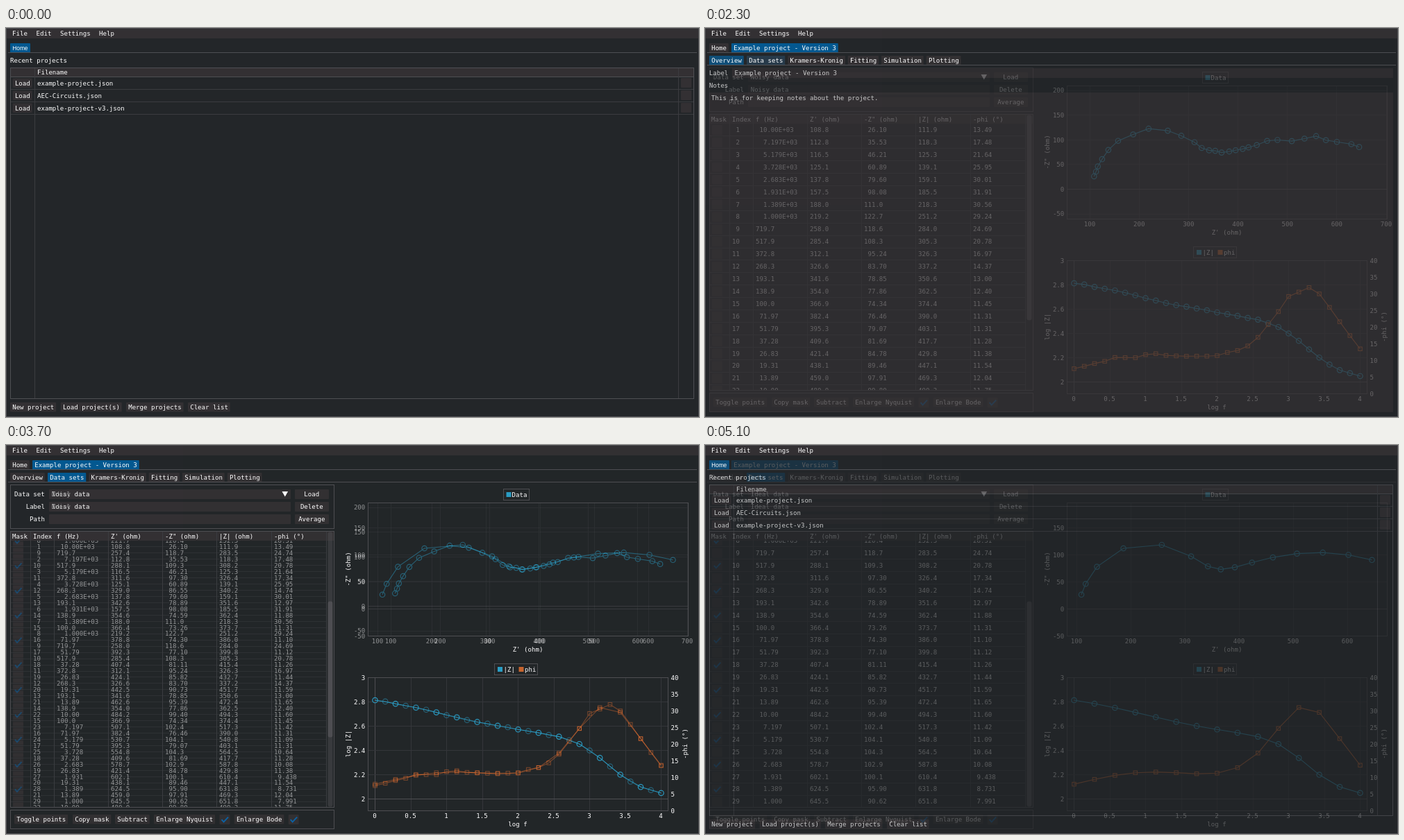
These frames come from a looping animation (998 by 561 pixels, 5.2 s). An HTML page:

```html
<!DOCTYPE html>
<html lang="en">
<head>
<meta charset="utf-8">
<title>Impedance project viewer</title>
<style>
  html, body { margin: 0; width: 100%; height: 100%; overflow: hidden; background: #232629; }
  svg.scene { position: absolute; left: 0; top: 0; width: 998px; height: 561px; }
  text { font: 9.09px "DejaVu Sans Mono", monospace; fill: #fff; white-space: pre; }
  text.sans { font: 8.4px "Liberation Sans", Arial, sans-serif; }
</style>
</head>
<body>
<script>
const BG = '#232629', FRAME = '#333033', BORDER = '#4e4f53', LINE = '#3b3c40', GRID = '#34373a';
const ACTIVE = '#035890', CHECK = '#0d62a3', BLUE = '#2b9cc3', ORANGE = '#c6642f', THUMB = '#4f4e52';
const CHAR = 5.472;

// ---- drawing helpers (each returns SVG markup) ----
const rect = (x, y, x2, y2, fill, r = 0) =>
  `<rect x="${x}" y="${y}" width="${x2 - x}" height="${y2 - y}" rx="${r}" fill="${fill}"/>`;
const box = (x, y, x2, y2, color = BORDER) =>
  `<rect x="${x + .5}" y="${y + .5}" width="${x2 - x}" height="${y2 - y}" fill="none" stroke="${color}"/>`;
const line = (x, y, x2, y2, color = LINE) =>
  `<path d="M${x} ${y}L${x2} ${y2}" stroke="${color}"/>`;
const hline = (x, x2, y, color) => line(x, y + .5, x2, y + .5, color);
const vline = (x, y, y2, color) => line(x + .5, y, x + .5, y2, color);
const escape = s => String(s).replace(/&/g, '&amp;').replace(/</g, '&lt;');
const text = (x, cy, s, attrs = '') => `<text x="${x}" y="${cy + 3.2}" ${attrs}>${escape(s)}</text>`;
const mid = 'text-anchor="middle"', end = 'text-anchor="end"';
const turned = (x, cy, s) =>
  `<text transform="translate(${x + 3.2} ${cy}) rotate(-90)" ${mid}>${escape(s)}</text>`;
const button = (x, y, label, fill = FRAME, h = 13.5) =>
  rect(x, y, x + label.length * CHAR + 6, y + h, fill, 1) + text(x + 3.2, y + h / 2 + .2, label);
const checkbox = (x, cy, on) => rect(x, cy - 7, x + 15, cy + 7.3, FRAME, 1) +
  (on ? `<path d="M${x + 3} ${cy + .2}l3 3.4 6.5 -7" fill="none" stroke="${CHECK}" stroke-width="2"/>` : '');

// ---- data ----
const freqs = Array.from({ length: 29 }, (_, i) => 10 ** (4 - i / 7));

// R(RC)(RW) equivalent circuit, returned as [Re Z, -Im Z]
function circuit(f) {
  const w = 2 * Math.PI * f, t = w * 200 * 0.8e-6, d = 1 + t * t;
  const b = 4e-4 * Math.sqrt(w / 2), a = 1 / 500 + b, m = a * a + b * b;
  return [100 + 200 / d + a / m, 200 * t / d + b / m];
}
const ideal = freqs.map(circuit);

const noisyRe = [108.8, 112.8, 116.5, 125.1, 137.8, 157.5, 188, 219.2, 258, 285.4, 312.1, 326.6, 341.6, 354, 366.9,
  382.4, 395.3, 409.6, 421.4, 438.1, 459, 480, 508.9, 534.6, 558.2, 578, 600.2, 629.5, 645.3];
const noisyIm = [26.1, 35.53, 46.21, 60.89, 79.6, 98.08, 111, 122.7, 118.6, 108.3, 95.24, 83.7, 78.85, 77.86, 74.34,
  76.46, 79.07, 81.69, 84.78, 89.46, 97.91, 99.8, 97.5, 102.6, 107.6, 99.4, 96, 91.4, 85.5];
const noisy = noisyRe.map((re, i) => [re, noisyIm[i]]);

const abs = z => Math.hypot(...z);
const phase = z => Math.atan2(z[1], z[0]) * 180 / Math.PI;
const num = (v, digits = 3) => {
  const s = v > 999.9 ? (v / 1000).toPrecision(4) + 'E+03' : v.toPrecision(4);
  return ' '.repeat(Math.max(0, digits - s.indexOf('.'))) + s;
};

// ---- shared window parts ----
const frameParts = tabs => rect(0, 0, 998, 561, BG) + rect(0, 0, 998, 15, FRAME) + box(0, 0, 997, 560) +
  [['File', 9], ['Edit', 43.5], ['Settings', 78], ['Help', 134]].map(([s, x]) => text(x, 8, s)).join('') +
  tabs + hline(3, 995, 35, BORDER);

function projectParts(active) {
  const tabs = [['Overview', 6], ['Data sets', 60], ['Kramers-Kronig', 119.3], ['Fitting', 205.7],
    ['Simulation', 254], ['Plotting', 318.7]];
  return frameParts(button(6, 22, 'Home') + button(38, 22, 'Example project - Version 3', ACTIVE)) +
    tabs.map(([s, x]) => button(x, 40, s, s === active ? ACTIVE : FRAME)).join('') +
    hline(3, 995, 53, BORDER);
}

function homeScene() {
  const files = ['example-project.json', 'AEC-Circuits.json', 'example-project-v3.json'];
  const actions = [['New project', 6], ['Load project(s)', 78.7], ['Merge projects', 173], ['Clear list', 262]];
  return frameParts(rect(6, 22, 35, 35.5, ACTIVE, 1) + text(9.2, 29, 'Home', 'class="sans"')) +
    text(6, 47, 'Recent projects') + rect(7, 57, 990, 70, FRAME) + text(45, 64, 'Filename') +
    files.map((name, i) => {
      const y = 70 + 18 * i;
      return button(9.7, y + 2.5, 'Load') + text(45, y + 9.5, name) +
        rect(972, y + 2, 987, y + 16, FRAME, 1) + hline(7, 990, y + 18);
    }).join('') +
    hline(7, 990, 70, BORDER) + vline(41, 57, 534) + vline(968, 57, 534) + box(6, 57, 984 + 6, 534) +
    actions.map(([s, x]) => button(x, 540, s)).join('');
}

const overviewScene = () => projectParts('Overview') +
  text(6, 65, 'Label') + rect(39, 58, 991, 72, FRAME, 1) + text(42.5, 65, 'Example project - Version 3') +
  text(6, 83, 'Notes') + rect(6, 93, 991, 554, FRAME, 1) +
  text(9, 101, 'This is for keeping notes about the project.');

// ---- data set page ----
function table(set) {
  const heads = [['Mask', 9], ['Index', 39], ['f (Hz)', 73], ["Z' (ohm)", 151], ['-Z" (ohm)', 229],
    ['|Z| (ohm)', 307], ['-phi (°)', 386]];
  const pitch = 17.92;
  let rows = '';
  set.points.forEach((z, i) => {
    const cy = set.firstRow + pitch * i;
    if (cy < 128 || cy > 532) return;
    rows += hline(7, 462, Math.round(cy + pitch / 2 - .5)) + checkbox(10, cy, set.masked && i % 2) +
      text(39, cy, String(i + 1).padStart(2)) + text(73, cy, num(freqs[i])) + text(151, cy, num(z[0])) +
      text(229, cy, num(z[1])) + text(307, cy, num(abs(z))) + text(386, cy, num(phase(z), 2));
  });
  return `<svg x="7" y="138" width="456" height="384" viewBox="7 138 456 384">${rows}</svg>` +
    rect(7, 125, 472, 138, FRAME) + heads.map(([s, x]) => text(x, 131.5, s)).join('') +
    [35, 69, 147, 225, 303, 382, 461].map(x => vline(x, 125, 522)).join('') +
    rect(463.5, set.thumb, 470.5, set.thumb + 296, THUMB, 3) + box(6, 124, 472, 522);
}

const polyline = (pts, color) =>
  `<path d="M${pts.map(p => p.map(v => v.toFixed(2)).join(' ')).join('L')}" fill="none" stroke="${color}" stroke-width="1.1"/>`;
const circles = pts => polyline(pts, BLUE) + pts.map(([x, y]) =>
  `<circle cx="${x}" cy="${y}" r="3.7" fill="none" stroke="${BLUE}" stroke-width="1.2"/>`).join('');
const squares = pts => polyline(pts, ORANGE) + pts.map(([x, y]) =>
  `<rect x="${x - 2.7}" y="${y - 2.7}" width="5.4" height="5.4" fill="none" stroke="${ORANGE}" stroke-width="1.1"/>`).join('');
const range = (from, to, step) =>
  Array.from({ length: Math.round((to - from) / step) + 1 }, (_, i) => +(from + i * step).toFixed(2));

function nyquist(set, points) {
  const { x100, y0, unit, maxX, maxY } = set;
  const X = v => x100 + (v - 100) * unit, Y = v => y0 - v * unit;
  const px = v => Math.floor(v);
  return range(100, maxX, 100).map(v => vline(px(X(v)), 83, 275, GRID) + text(X(v), 283, v, mid)).join('') +
    range(-50, maxY, 50).map(v => hline(521, 982, px(Y(v)), v ? GRID : BORDER) + text(517.3, Y(v), v, end)).join('') +
    box(521, 83, 982, 275) + turned(493, 179, '-Z" (ohm)') + text(751.5, 295, "Z' (ohm)", mid) +
    circles(points.map(z => [X(z[0]), Y(z[1])])) +
    box(716, 63, 753, 79) + rect(720.5, 68, 727.5, 75, BLUE) + text(728.5, 71.7, 'Data');
}

function bode(points) {
  const X = v => 531.5 + v * 103, Y = v => 510.5 - (v - 2) * 175, P = v => 527.5 - v * 4.8;
  return range(0, 4, .5).map(v => vline(Math.floor(X(v)), 335, 527, v ? GRID : BORDER) + text(X(v) - .5, 535, v, mid)).join('') +
    range(2, 3, .2).map(v => hline(521, 953, Math.floor(Y(v)), v > 2 ? GRID : BORDER) + text(517.3, Y(v), v, end)).join('') +
    range(0, 40, 5).map(v => text(957.5, P(v), v)).join('') +
    box(521, 335, 953, 527) + turned(493, 431, 'log |Z|') + turned(978, 431, '-phi (°)') + text(737, 546.5, 'log f', mid) +
    circles(points.map(p => [X(Math.log10(p.f)), Y(Math.log10(abs(p.z)))])) +
    squares(points.map(p => [X(Math.log10(p.f)), P(phase(p.z))])) +
    box(703, 315, 765, 331) + rect(708, 320, 715, 327, BLUE) + text(716.5, 323.7, '|Z|') +
    rect(738.5, 320, 745.5, 327, ORANGE) + text(747, 323.7, 'phi');
}

function dataScene(set) {
  const shown = set.points.map((z, i) => ({ z, f: freqs[i] })).filter((_, i) => !set.masked || i % 2 === 0);
  const fields = [['Data set', 12, set.name, 'Load'], ['Label', 28.7, set.name, 'Delete'], ['Path', 34, '', 'Average']];
  return projectParts('Data sets') + box(6, 57, 472, 120) +
    fields.map(([label, x, value, action], i) => {
      const cy = 71 + 18 * i;
      return text(x, cy, label) + rect(62, cy - 7, 410, cy + 7, FRAME, 1) + text(65.7, cy, value) +
        rect(416, cy - 7, 465, cy + 7, FRAME, 1) + text(440.3, cy, action, mid);
    }).join('') + '<path d="M397.5 67h8.6l-4.3 7.6z" fill="#fff"/>' +
    table(set) + box(6, 526, 472, 553) +
    [['Toggle points', 12], ['Copy mask', 96], ['Subtract', 157], ['Enlarge Nyquist', 213], ['Enlarge Bode', 328.7]]
      .map(([s, x]) => button(x, 533, s)).join('') +
    checkbox(307.5, 540, true) + checkbox(406.7, 540, true) +
    nyquist(set, shown.map(p => p.z)) + bode(shown);
}

const noisySet = { name: 'Noisy data', points: noisy, masked: false, firstRow: 146.8, thumb: 125.5,
  x100: 554, y0: 232.5, unit: .7117, maxX: 700, maxY: 200 };
const idealSet = { name: 'Ideal data', points: ideal, masked: true, firstRow: 514.2 - 17.92 * 28, thumb: 225.5,
  x100: 535, y0: 236.5, unit: .78, maxX: 600, maxY: 150 };

// ---- stepped cross-fades: [time, opacity] per layer, later layers on top ----
const LOOP = 5200;
const fade = (start, from = 0, to = 1) => [1, 2, 3, 4].map((k, i) => [start + 100 * i, from + (to - from) * k / 4]);
const layers = [
  [homeScene(), [[0, 1]]],
  [overviewScene(), [[0, 0], ...fade(1000), [4000, 0]]],
  [dataScene(noisySet), [[0, 0], ...fade(2300), [4000, 0]]],
  [dataScene(idealSet), [[0, 0], ...fade(3600), ...fade(4900, 1, 0)]],
];
for (const [markup, steps] of layers) {
  document.body.insertAdjacentHTML('beforeend', `<svg class="scene" viewBox="0 0 998 561">${markup}</svg>`);
  const keys = steps.map(([t, opacity]) => ({ offset: t / LOOP, opacity, easing: 'steps(1, end)' }));
  if (keys[keys.length - 1].offset < 1) keys.push({ offset: 1, opacity: steps[steps.length - 1][1] });
  const anim = document.body.lastElementChild.animate(keys, { duration: LOOP, iterations: Infinity });
  anim.startTime = 0;
  anim.startTime = document.timeline.currentTime;
}
</script>
</body>
</html>
```
